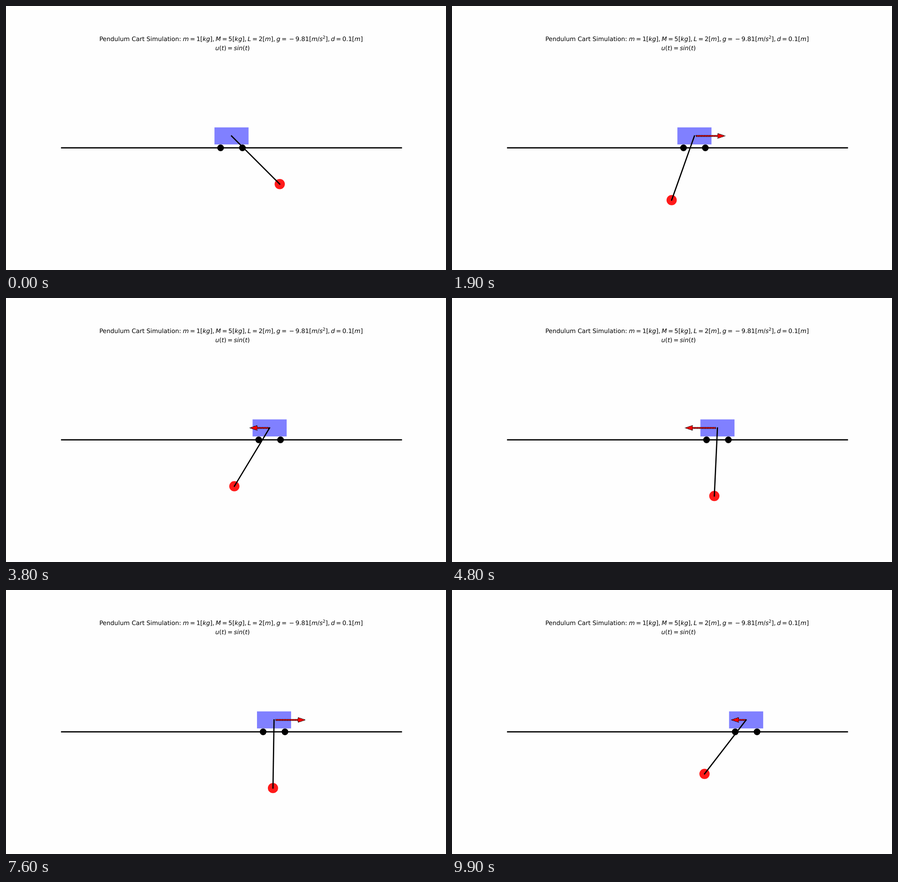
An HTML page for the animation above (10 s loop, 966x580 px).

```html
<!DOCTYPE html>
<html lang="en">
<head>
<meta charset="utf-8">
<title>Pendulum Cart Simulation</title>
<style>
  html, body { margin: 0; width: 100%; height: 100%; overflow: hidden; background: #fefefe; }
  svg { display: block; }
  text { font: 13.42px "DejaVu Sans", sans-serif; text-rendering: geometricPrecision; }
  .var { font-style: italic; }
  .sup { font-size: 9.39px; }
  .line { stroke: #000; stroke-width: .0358; fill: none; }
  #arrow {
    fill: #f00; stroke: #000; stroke-width: .0179; stroke-dasharray: .0179 .0296;
    stroke-linecap: round; stroke-linejoin: round;
  }
</style>
</head>
<body>
<svg width="966" height="580" viewBox="0 0 966 580">
  <text x="205" y="76.5">Pendulum Cart Simulation:</text>
  <text id="params" x="388.2" y="76.5"></text>
  <text id="force" x="459.4" y="97.4"></text>
  <!-- world units are metres -->
  <g transform="translate(495.1 292.9) scale(74.865)">
    <circle id="bob" r=".15" fill="#ff1a1a"/>
    <rect class="cart" x="-.5" y="-.35" width="1" height=".5" fill="#8080ff"/>
    <path class="line" d="M-5 .25H5"/>
    <g class="cart">
      <circle cx="-.32" cy=".25" r=".099"/>
      <circle cx=".32" cy=".25" r=".099"/>
    </g>
    <path id="rod" class="line" stroke-linecap="square"/>
    <g class="cart"><path id="arrow" transform="translate(0 -.1)"/></g>
  </g>
</svg>
<script>
const $ = id => document.getElementById(id);
const m = 1, M = 5, L = 2, g = 9.81, drag = 0.1;
const STEP = 100, COUNT = 100, PIVOT = -0.1;

// Math typesetting: slanted letters, thin spaces around operators
function typeset(el, str) {
  const thin = 2.7, rise = 4.9;
  let gap = 0, drop = 0;
  for (const ch of str) {
    const span = document.createElementNS(el.namespaceURI, 'tspan');
    const sup = ch === '²';
    span.textContent = sup ? '2' : ch;
    span.setAttribute('class', sup ? 'sup' : /[a-z]/i.test(ch) ? 'var' : '');
    span.setAttribute('dx', gap + ('=−'.includes(ch) ? thin : 0));
    span.setAttribute('dy', sup ? -rise : drop);
    drop = sup ? rise : 0;
    gap = '=,−'.includes(ch) ? thin : 0;
    el.append(span);
  }
}

// State: cart position, cart speed, angle, angular speed
function slope(t, [, v, a, w]) {
  const s = Math.sin(a), c = Math.cos(a), mass = M + m * s * s;
  const push = Math.sin(t) - drag * v + m * L * w * w * s;
  return [v, (push + m * g * s * c) / mass,
          w, -(c * push + (m + M) * g * s) / (L * mass)];
}

// Dormand-Prince 5(4): stages, error weights, dense output weights
const NODES = [0, 1 / 5, 3 / 10, 4 / 5, 8 / 9, 1, 1];
const STAGES = [
  [],
  [1 / 5],
  [3 / 40, 9 / 40],
  [44 / 45, -56 / 15, 32 / 9],
  [19372 / 6561, -25360 / 2187, 64448 / 6561, -212 / 729],
  [9017 / 3168, -355 / 33, 46732 / 5247, 49 / 176, -5103 / 18656],
  [35 / 384, 0, 500 / 1113, 125 / 192, -2187 / 6784, 11 / 84],
];
const ERROR = [-71 / 57600, 0, 71 / 16695, -71 / 1920, 17253 / 339200, -22 / 525, 1 / 40];
const DENSE = [-12715105075 / 11282082432, 0, 87487479700 / 32700410799,
  -10690763975 / 1880347072, 701980252875 / 199316789632,
  -1453857185 / 822651844, 69997945 / 29380423];
const RTOL = 1e-3, ATOL = 1e-6;

const mix = (weights, ks, h) =>
  [0, 1, 2, 3].map(i => h * weights.reduce((sum, q, j) => sum + q * ks[j][i], 0));
const plus = (a, b) => a.map((q, i) => q + b[i]);
const norm = (v, size) =>
  Math.sqrt(v.reduce((sum, q, i) => sum + (q / (ATOL + RTOL * size[i])) ** 2, 0) / v.length);

function firstStep(y) {
  const size = y.map(Math.abs), f = slope(0, y);
  const d1 = norm(f, size), h = 0.01 * norm(y, size) / d1;
  const next = slope(h, plus(y, f.map(q => q * h)));
  const d2 = norm(next.map((q, i) => q - f[i]), size) / h;
  return Math.min(100 * h, (0.01 / Math.max(d1, d2)) ** 0.2);
}

function solve(y, end) {
  const out = [y];
  let t = 0, h = firstStep(y), limit = 10;
  while (out.length < COUNT) {
    h = Math.min(h, end - t);
    const ks = [];
    let next;
    STAGES.forEach((row, j) => {
      next = plus(y, mix(row, ks, h));
      ks.push(slope(t + NODES[j] * h, next));
    });
    const size = y.map((q, i) => Math.max(Math.abs(q), Math.abs(next[i])));
    const err = norm(mix(ERROR, ks, h), size);
    const factor = Math.min(limit, Math.max(0.2, 0.9 * err ** -0.2));
    if (err >= 1) {
      h *= factor;
      limit = 1;
      continue;
    }
    const bend = mix(DENSE, ks, h);
    for (; out.length < COUNT && out.length / 10 <= t + h; ) {
      const p = (out.length / 10 - t) / h, r = 1 - p;
      out.push(y.map((q, i) => {
        const dy = next[i] - q, b = h * ks[0][i] - dy;
        return q + p * (dy + r * (b + p * (dy - h * ks[6][i] - b + r * bend[i])));
      }));
    }
    t += h;
    y = next;
    h *= factor;
    limit = 10;
  }
  return out;
}

const states = solve([0, 0, Math.PI / 4, 0], COUNT / 10);

// Force arrow, trimmed at both ends; a short one is only a head
function arrowPath(u) {
  if (!u) return '';
  const dir = Math.sign(u), head = 0.215, trim = 0.05;
  const tail = trim * u, tip = u - tail, neck = tip - dir * head;
  const side = [[neck, -.0717 * dir]];
  if (Math.abs(tip - tail) > head) side.unshift([tail, -.0179 * dir], [neck, -.0179 * dir]);
  const mirror = side.map(([x, y]) => [x, -y]).reverse();
  return 'M' + [...side, [tip, 0], ...mirror].map(p => p.join(' ')).join('L') + 'Z';
}

function draw() {
  const i = Math.floor(performance.now() / STEP) % COUNT;
  const [x, , a] = states[i];
  const bx = x + L * Math.sin(a), by = PIVOT + L * Math.cos(a);
  for (const el of document.querySelectorAll('.cart')) el.setAttribute('transform', `translate(${x} 0)`);
  $('arrow').setAttribute('d', arrowPath(Math.sin(i / 10)));
  $('rod').setAttribute('d', `M${x} ${PIVOT}L${bx} ${by}`);
  $('bob').setAttribute('cx', bx);
  $('bob').setAttribute('cy', by);
  requestAnimationFrame(draw);
}

typeset($('params'), 'm=1[kg],M=5[kg],L=2[m],g=−9.81[m/s²],d=0.1[m]');
typeset($('force'), 'u(t)=sin(t)');
draw();
</script>
</body>
</html>
```
